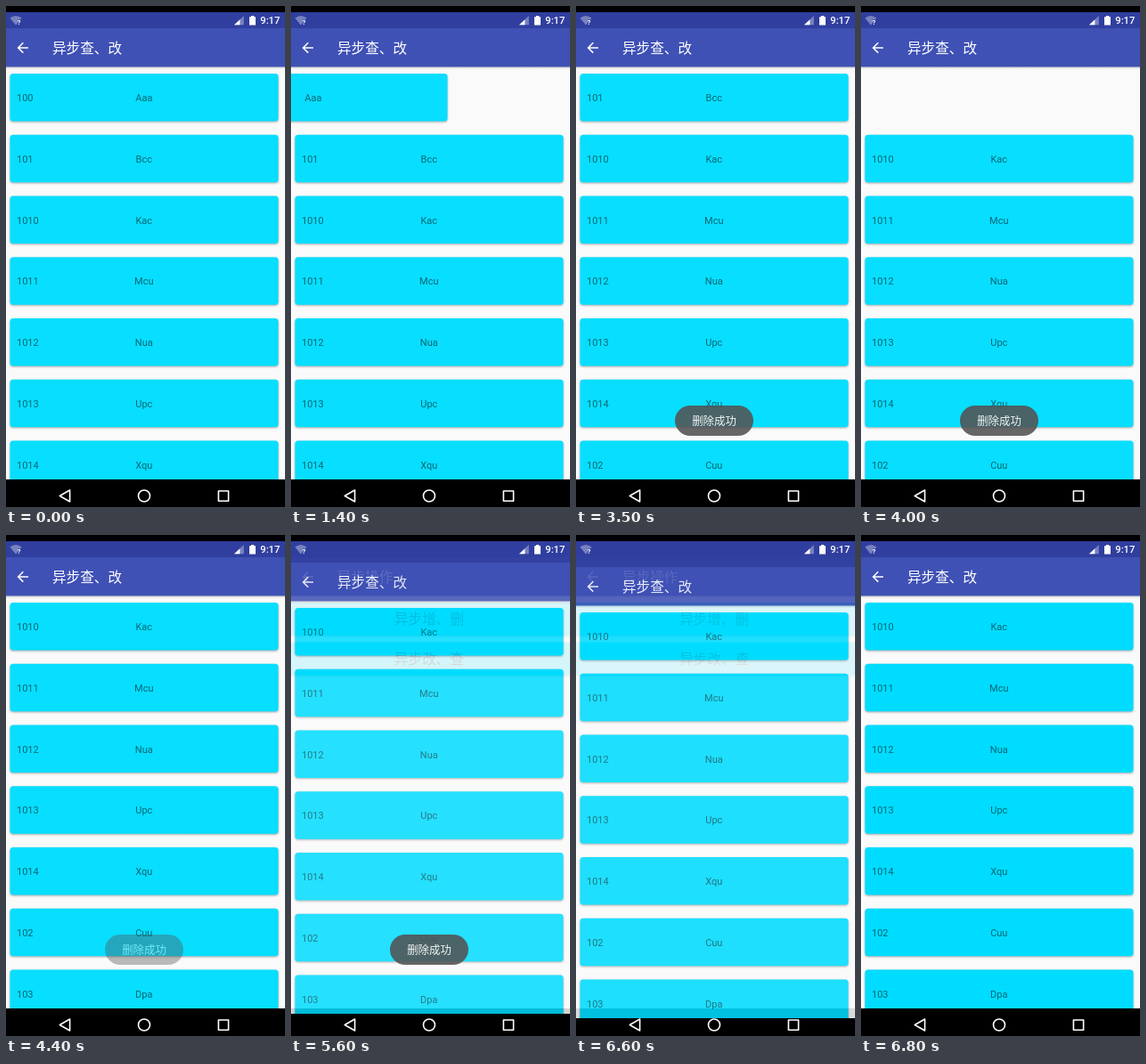
An HTML page for the animation above (8800 ms loop, 313 px wide and 563 px high).

```html
<!DOCTYPE html>
<html lang="zh-CN">
<head>
<meta charset="utf-8">
<title>异步操作</title>
<style>
  html, body { margin: 0; width: 100%; height: 100%; overflow: hidden; background: #000; }
  svg { display: block; width: 100%; height: 100%; }
  text { font-family: Roboto, "Noto Sans CJK SC", "Noto Sans CJK", sans-serif; }
  .title { font-size: 15.6px; fill: #fff; }
  .cell { font-size: 11px; fill: rgba(0, 0, 0, .54); }
  .button { font-size: 15.6px; fill: rgba(0, 0, 0, .87); text-anchor: middle; }
  .mid { text-anchor: middle; }
  .raised { filter: drop-shadow(0 1px .8px rgba(0, 0, 0, .32)); }
</style>
</head>
<body>
<svg id="stage" viewBox="0 0 313 563" preserveAspectRatio="none">
  <defs>
    <linearGradient id="shade" x2="0" y2="1">
      <stop offset="0" stop-color="#000" stop-opacity=".22"/>
      <stop offset="1" stop-color="#000" stop-opacity="0"/>
    </linearGradient>
  </defs>
</svg>
<script>
const LOOP = 8800, STEP = 100, PITCH = 68.75;
const stage = document.getElementById('stage');

const people = [
  [100, 'Aaa'], [101, 'Bcc'], [1010, 'Kac'], [1011, 'Mcu'], [1012, 'Nua'],
  [1013, 'Upc'], [1014, 'Xqu'], [102, 'Cuu'], [103, 'Dpa']
];

// Keys are [time, value]; values between keys are linear.
const swipeKeys = [
  [1300, 0], [1400, -130], [1500, -225], [1600, -312], [1900, -312], [2000, 0],
  [3500, 0], [3600, 50], [3700, 150], [3800, 255], [3900, 315], [4000, 315], [4100, 0]
];
const toastKeys = [
  [1900, 0], [2000, .35], [2100, .75], [2200, 1], [4200, 1], [4300, .85], [4400, .44],
  [4500, 0], [4600, .5], [4700, 1], [6100, 1], [6200, .85], [6300, .45], [6400, .15], [6500, 0]
];
const fadeKeys = [
  [5500, 1], [5600, .85], [5700, .3], [5800, 0], [6500, 0], [6600, .88], [6700, .97], [6800, 1]
];
const shiftKeys = [
  [5500, 0], [5600, 6], [5700, 24], [5800, 45], [6500, 45], [6600, 11], [6700, 3], [6800, 0]
];

function valueAt(keys, t) {
  if (t <= keys[0][0]) return keys[0][1];
  for (let i = 1; i < keys.length; i++) {
    const [t0, a] = keys[i - 1], [t1, b] = keys[i];
    if (t <= t1) return a + (b - a) * (t - t0) / (t1 - t0);
  }
  return keys[keys.length - 1][1];
}

function add(parent, tag, attrs = {}, content) {
  const el = document.createElementNS('http://www.w3.org/2000/svg', tag);
  for (const k in attrs) el.setAttribute(k, attrs[k]);
  if (content !== undefined) el.textContent = content;
  parent.appendChild(el);
  return el;
}

function rect(parent, x, y, width, height, fill, more) {
  return add(parent, 'rect', { x, y, width, height, fill, ...more });
}

function addPage(title, fillBody) {
  const page = add(stage, 'g');
  rect(page, 0, 25, 313, 507, '#fafafa');
  fillBody(page);
  rect(page, 0, 68, 313, 3, 'url(#shade)');
  rect(page, 0, 7, 313, 18.5, '#303f9f');
  rect(page, 0, 25, 313, 43.4, '#3f51b5');
  rect(page, 0, 532, 313, 80, '#000');
  add(page, 'path', {
    d: 'M20 11H7.83l5.59-5.59L12 4l-8 8 8 8 1.41-1.41L7.83 13H20z',
    transform: 'translate(9.4 37.6) scale(.78)', fill: '#fff'
  });
  add(page, 'text', { x: 52, y: 52.8, class: 'title' }, title);
  return page;
}

addPage('异步操作', page => {
  [['异步增、删', 76], ['异步改、查', 120.7]].forEach(([label, y]) => {
    rect(page, 0, y, 313, 37, '#00dcff', { class: 'raised' });
    add(page, 'text', { x: 155, y: y + 24.2, class: 'button' }, label);
  });
});

const rows = [];
const list = addPage('异步查、改', page => {
  for (let i = 0; i < 7; i++) {
    const y = 76 + i * PITCH;
    const g = add(page, 'g');
    rows.push({
      g,
      card: rect(g, 4.5, y, 301, 53.5, '#08deff', { rx: 3.5, class: 'raised' }),
      id: add(g, 'text', { x: 12, y: y + 31.2, class: 'cell' }),
      name: add(g, 'text', { x: 154.8, y: y + 31.2, class: 'cell mid' })
    });
  }
});

// System bars stay above both pages.
rect(stage, 0, 0, 313, 7, '#000');
const bars = add(stage, 'g', { fill: '#fff' });
add(bars, 'path', { d: 'M4.5 13.6Q11 8.6 17.5 13.6L16 15.4H13V19.2L11 21.4Z', 'fill-opacity': .35 });
add(bars, 'text', { x: 12.4, y: 21, 'font-size': 8, 'font-weight': 700 }, '?');
add(bars, 'path', { d: 'M256 21.3L266.8 11V21.3Z', 'fill-opacity': .35 });
add(bars, 'path', { d: 'M256 21.3L262.4 15.2V21.3Z' });
add(bars, 'path', { d: 'M273 12.2H275V11H278.2V12.2H280V21.4H273Z' });
add(bars, 'text', { x: 285.3, y: 20.4, 'font-size': 11.2, 'font-weight': 500 }, '9:17');
const nav = add(stage, 'g', { fill: 'none', stroke: '#fff', 'stroke-width': 1.6, 'stroke-linejoin': 'round' });
add(nav, 'path', { d: 'M60.3 550.5L71.6 544V557Z' });
add(nav, 'circle', { cx: 155, cy: 550.5, r: 6.5 });
add(nav, 'path', { d: 'M238.4 545H249.6V556.2H238.4Z' });

const toast = add(stage, 'g');
rect(toast, 111, 449, 88, 34, '#525252', { rx: 17, 'fill-opacity': .88 });
add(toast, 'text', { x: 155, y: 470.7, 'font-size': 12.4, fill: '#f4f4f4', class: 'mid' }, '删除成功');

function render(time) {
  const t = Math.floor((time % LOOP) / STEP) * STEP;
  const first = t < 2000 ? 0 : t < 4100 ? 1 : 2;
  const color = t < 5600 ? '#08deff' : '#00dcff';
  rows.forEach((row, i) => {
    const [id, name] = people[first + i];
    row.id.textContent = id;
    row.name.textContent = name;
    row.card.setAttribute('fill', color);
  });
  rows[0].g.setAttribute('transform', `translate(${valueAt(swipeKeys, t)} 0)`);
  list.setAttribute('transform', `translate(0 ${valueAt(shiftKeys, t)})`);
  list.setAttribute('opacity', valueAt(fadeKeys, t));
  toast.setAttribute('opacity', valueAt(toastKeys, t));
}

const start = performance.now();
function tick() {
  render(performance.now() - start);
  requestAnimationFrame(tick);
}
tick();
</script>
</body>
</html>
```
